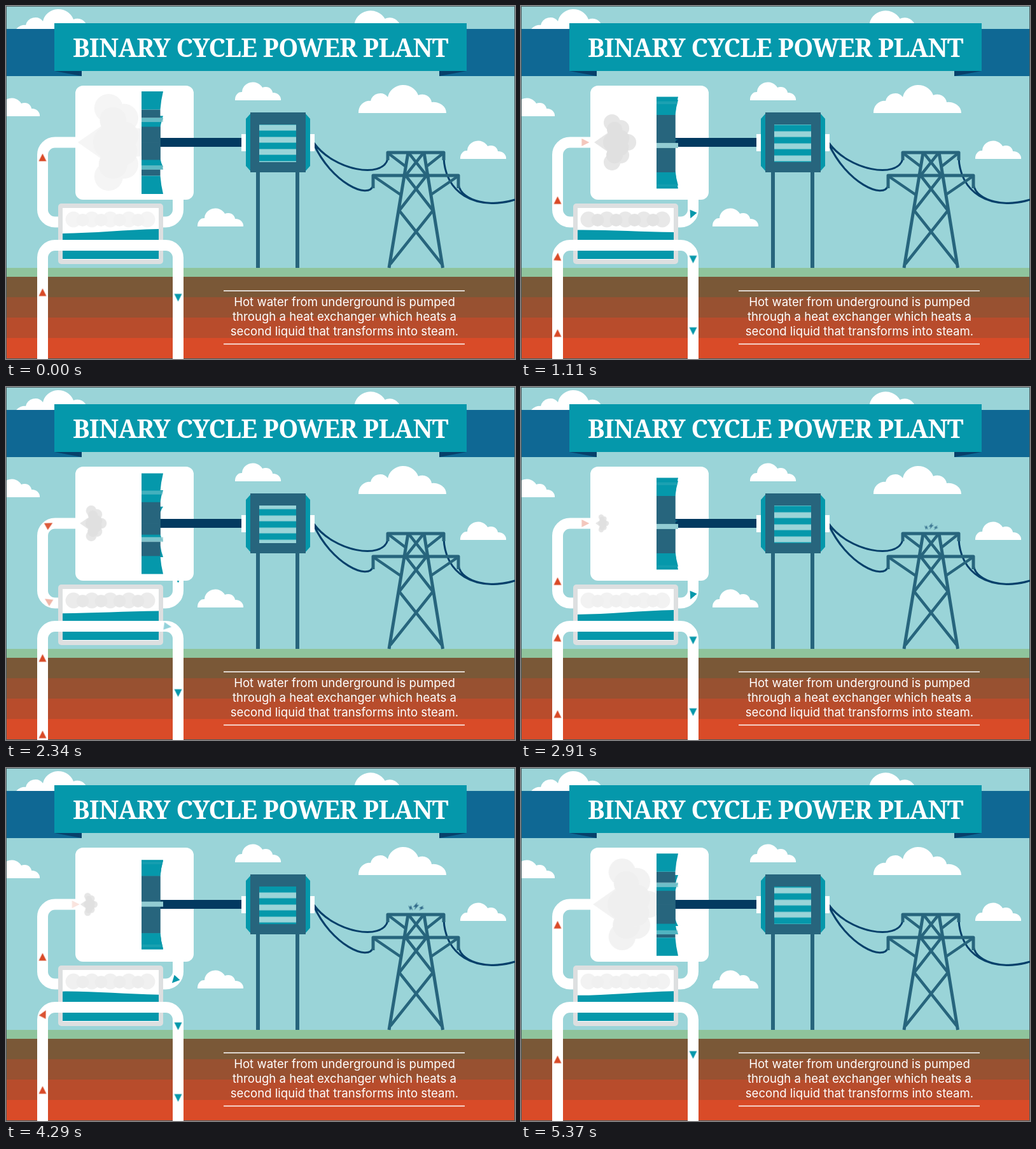
An HTML page that plays this animation: 800x554 px, repeating every 5.4 s.

```html
<!DOCTYPE html>
<html lang="en">
<head>
<meta charset="utf-8">
<title>Binary Cycle Power Plant</title>
<style>
  html, body { margin: 0; width: 100%; height: 100%; overflow: hidden; background: #9ad4d8; }
  svg { display: block; width: 100%; height: 100%; }
  .teal { fill: #0598ab; }
  .steel { fill: #27657d; }
  .white { fill: #fff; }
  .pipe { fill: none; stroke: #fff; stroke-width: 17; }
  .pylon { fill: none; stroke: #27657d; stroke-width: 5; stroke-linejoin: round; }
  .wire { fill: none; stroke: #07406a; stroke-width: 3; }
  .title { font: 700 39.5px "Noto Serif", "Liberation Serif", serif; letter-spacing: -.75px; fill: #fff; text-anchor: middle; }
  .caption { font: 400 18.6px Inter, Lato, sans-serif; fill: #fff; text-anchor: middle; }

  /* Arrows follow their pipe; two per pipe, half a cycle apart */
  .arrow { offset-rotate: auto; animation: travel 900ms linear infinite, show 900ms linear infinite; }
  .arrow.next { animation-delay: -450ms; }
  .hot { fill: #d94a27; }
  .well { --len: 240px; animation-name: travel, fade-well;
    offset-path: path("M57.5 570V395A19.5 19.5 0 0 1 77 375.5H130"); }
  .drain { --len: 225px; animation-name: travel, fade-drain;
    offset-path: path("M231 375.5H251A19.5 19.5 0 0 1 270.5 395V600"); }
  .riser { --len: 252px; animation-name: travel, fade-riser;
    offset-path: path("M91.4 339H77A19.5 19.5 0 0 1 57.5 319.5V233.5A19.5 19.5 0 0 1 77 214H200"); }
  .return { --len: 99px; animation-name: travel; animation-duration: 450ms;
    offset-path: path("M270.5 281V319.5A19.5 19.5 0 0 1 251 339H180"); }
  @keyframes travel { from { offset-distance: 0px; } to { offset-distance: var(--len); } }
  @keyframes fade-well { 0%, 76% { opacity: 1; } 87% { opacity: .35; } 95%, 100% { opacity: 0; } }
  @keyframes fade-drain { 0%, 4% { opacity: 0; } 18%, 100% { opacity: 1; } }
  @keyframes fade-riser {
    0%, 6% { opacity: 0; } 16%, 58% { opacity: 1; }
    67% { opacity: .6; } 73% { opacity: .33; } 80%, 100% { opacity: 0; }
  }

  .steam { animation: puff 675ms linear -495ms infinite, thin 675ms linear -495ms infinite; }
  @keyframes puff { from { transform: scale(.227); } to { transform: scale(2.27); } }
  @keyframes thin { 0%, 44% { opacity: 1; } 95%, 100% { opacity: 0; } }

  .sparks { animation: burst 1350ms linear infinite, glow 1350ms linear infinite; }
  @keyframes burst { from { transform: scale(0); } 63%, to { transform: scale(1.89); } }
  @keyframes glow { 0% { opacity: 0; } 25%, 40% { opacity: 1; } 63%, 100% { opacity: 0; } }

  .stripes { animation: roll 450ms linear infinite; }
  @keyframes roll { to { transform: translateY(-19px); } }

  .water { animation: slosh 1350ms cubic-bezier(.37, 0, .63, 1) -2590ms infinite alternate; }
  @keyframes slosh {
    from { d: path("M89 357C135 357 190 351 240 350V397H89Z"); }
    to { d: path("M89 350.5C135 350 190 355 240 356V397H89Z"); }
  }

  .vapour { fill: none; stroke-linecap: round;
    animation: simmer 337.5ms cubic-bezier(.37, 0, .63, 1) -245ms infinite alternate; }
  @keyframes simmer { from { opacity: 1; } to { opacity: .35; } }
</style>
</head>
<body>
<svg viewBox="0 0 800 554" preserveAspectRatio="none">
  <defs>
    <path id="cloud" d="M0 0A10 12 0 0 1 11 -13A17 16 0 0 1 43 -20A11 10 0 0 1 59 -12A12 11 0 0 1 72 0Z"/>
    <path id="bank" d="M0 0A17 18 0 0 1 19 -19A15 14 0 0 1 46 -25A25 24 0 0 1 94 -28A15 14 0 0 1 115 -17A20 17 0 0 1 138 0Z"/>
    <path id="tip" d="M6.5 0L-5.5 6V-6Z"/>
    <path id="bolt" d="M4 -10L-7 2L-1 2L-4 10L8 -3L2 -3Z"/>
    <clipPath id="chamber"><path d="M110 126H213V303H110Z"/></clipPath>
    <clipPath id="window"><path d="M398 186H456V245H398Z"/></clipPath>
  </defs>

  <rect width="800" height="554" fill="#9ad4d8"/>
  <g class="white">
    <use href="#bank" transform="translate(12 49)"/>
    <use href="#cloud" transform="translate(531 50) scale(1.5)"/>
    <use href="#cloud" transform="translate(-19 173)"/>
    <use href="#cloud" transform="translate(360 148)"/>
    <use href="#cloud" transform="translate(301 346)"/>
    <use href="#bank" transform="translate(554 168)"/>
    <use href="#cloud" transform="translate(714 240)"/>
  </g>

  <!-- Banner -->
  <path d="M0 36H119V110H0ZM681 36H800V110H681Z" fill="#0f6894"/>
  <path d="M76 102H119V110ZM724 102H681V110Z" fill="#07406a"/>
  <rect class="teal" x="76" y="27" width="648" height="75"/>
  <text class="title" x="400" y="80">BINARY CYCLE POWER PLANT</text>

  <!-- Ground -->
  <rect y="411" width="800" height="14" fill="#8fc49c"/>
  <rect y="425" width="800" height="32" fill="#7a5837"/>
  <rect y="457" width="800" height="32" fill="#985131"/>
  <rect y="489" width="800" height="32" fill="#b84c2c"/>
  <rect y="521" width="800" height="33" fill="#d94b28"/>
  <path d="M342 447H721M342 530.5H721" stroke="#fff" stroke-width="1.3"/>
  <text class="caption" x="532" y="470.5">Hot water from underground is pumped</text>
  <text class="caption" x="532" y="493.5">through a heat exchanger which heats a</text>
  <text class="caption" x="532" y="516.5">second liquid that transforms into steam.</text>
  <rect x=".5" y=".5" width="799" height="553" fill="none" stroke="#4b5c5f"/>

  <!-- Pylon and wires -->
  <path class="wire" d="M484 215C515 258 592 272 600 240M484 217C512 278 570 304 577 282M688 238C690 292 735 322 800 304M711 280C716 308 765 316 800 304"/>
  <g class="pylon">
    <path d="M602 411L632 230M686.5 411L657 230"/>
    <path d="M600 242V230H688V242M577 286V266H711V286"/>
    <path d="M602 232L627 251M686 232L662 251M579 268L620 296M709 268L668 296" stroke-width="4.5"/>
    <path d="M634 232L661 266M655 232L628 266M628 266L671 321M661 266L618 321M618 321L685 405M671 321L604 405" stroke-width="4.5"/>
  </g>
  <g transform="translate(645 228)">
    <g class="sparks" fill="#07406a">
      <use href="#bolt" transform="translate(-1.5 -21) scale(1.15)"/>
      <use href="#bolt" transform="translate(-17 -15.5) rotate(-62) scale(.95)"/>
      <use href="#bolt" transform="translate(14.5 -15.5) rotate(22) scale(.95)"/>
    </g>
  </g>

  <!-- Generator -->
  <path class="steel" d="M393 260H399V411H393ZM455 260H461V411H455Z"/>
  <path class="white" d="M370 201H378V228H370ZM477 201H485V228H477Z"/>
  <path class="teal" d="M386 167H469L478 177V251L469 261H386L377 251V177Z"/>
  <path class="steel" d="M384 167H471V261H384Z"/>
  <g clip-path="url(#window)">
    <rect class="teal" x="398" y="186" width="58" height="59"/>
    <path class="stripes" d="M427 186.5V270" stroke="#9ad4d8" stroke-width="58" stroke-dasharray="9 10"/>
  </g>

  <!-- Working-fluid loop -->
  <path class="pipe" d="M115 214H77A19.5 19.5 0 0 0 57.5 233.5V319.5A19.5 19.5 0 0 0 77 339H90M270.5 295V319.5A19.5 19.5 0 0 1 251 339H235"/>
  <use href="#tip" class="arrow return teal"/>
  <rect class="white" x="109" y="125" width="186" height="179" rx="12"/>
  <g clip-path="url(#chamber)">
    <g transform="translate(118 214)">
      <g class="steam">
        <g fill="#e6e6e6">
          <circle cx="25" cy="-31" r="13"/><circle cx="39" cy="-22" r="13"/>
          <circle cx="25" cy="31" r="13"/><circle cx="39" cy="20" r="13"/>
          <circle cx="50" cy="0" r="13"/><path d="M-3 0L20 -16V16Z"/>
        </g>
        <g fill="#e0e0e0">
          <circle cx="29" cy="-20" r="12"/><circle cx="39" cy="-6" r="13"/>
          <circle cx="29" cy="20" r="13"/><circle cx="38" cy="8" r="13"/>
          <circle cx="26" cy="0" r="15"/>
        </g>
      </g>
    </g>
  </g>
  <rect x="240" y="207" width="130" height="14" fill="#033a60"/>
  <g id="turbine"></g>

  <!-- Heat exchanger -->
  <rect x="82" y="310" width="165" height="95" rx="5" fill="#dddfe0"/>
  <rect class="white" x="89" y="317" width="151" height="81"/>
  <g class="vapour">
    <path d="M106 335H223" stroke="#e8e8e8" stroke-width="25" stroke-dasharray="0 29"/>
    <path d="M120.5 336H209" stroke="#e3e3e3" stroke-width="20" stroke-dasharray="0 29"/>
  </g>
  <path class="water teal" d="M89 357C135 357 190 351 240 350V397H89Z"/>

  <!-- Geothermal well -->
  <path class="pipe" d="M57.5 554V395A19.5 19.5 0 0 1 77 375.5H251A19.5 19.5 0 0 1 270.5 395V554"/>
  <use href="#tip" class="arrow well hot"/>
  <use href="#tip" class="arrow well hot next"/>
  <use href="#tip" class="arrow drain teal"/>
  <use href="#tip" class="arrow drain teal next"/>
  <use href="#tip" class="arrow riser hot"/>
  <use href="#tip" class="arrow riser hot next"/>
</svg>
<script>
  const turbine = document.getElementById('turbine');
  const AXIS = 214.5, HUB = 52, TIP = 80.5, CAP = 75;
  const LEFT = 213, RIGHT = 242.5, FLARE = 247;
  const BLADES = 6, STEP = Math.PI * 2 / BLADES, STEP_MS = 450, START = 0.55;

  // A blade seen from the side; angle 0 points at the viewer.
  function blade(angle) {
    const s = Math.sin(angle), depth = Math.cos(angle);
    const root = AXIS + HUB * s, tip = AXIS + TIP * s;
    let shape = `<path class="steel" d="M${LEFT} ${AXIS}H${RIGHT}V${root}H${LEFT}Z"/>` +
      `<path class="teal" d="M${LEFT} ${root}H${RIGHT}Q${RIGHT + 1} ${(root + tip) / 2} ${FLARE} ${tip}H${LEFT}Z"/>`;
    if (depth > 0.01) {
      // The end face only catches light when it turns to the viewer.
      const h = 8 * depth;
      shape += `<rect x="${LEFT}" y="${AXIS + CAP * s - h / 2}" width="${FLARE - LEFT}" height="${h}" fill="#93cdd3" opacity="${depth ** 3}"/>`;
    }
    return { depth, shape };
  }

  function draw(now) {
    const turn = START - STEP * (now % STEP_MS) / STEP_MS;
    turbine.innerHTML = Array.from({ length: BLADES }, (_, i) => blade(turn + i * STEP))
      .sort((a, b) => a.depth - b.depth)
      .map(b => b.shape).join('');
    requestAnimationFrame(draw);
  }
  draw(0);
</script>
</body>
</html>
```
